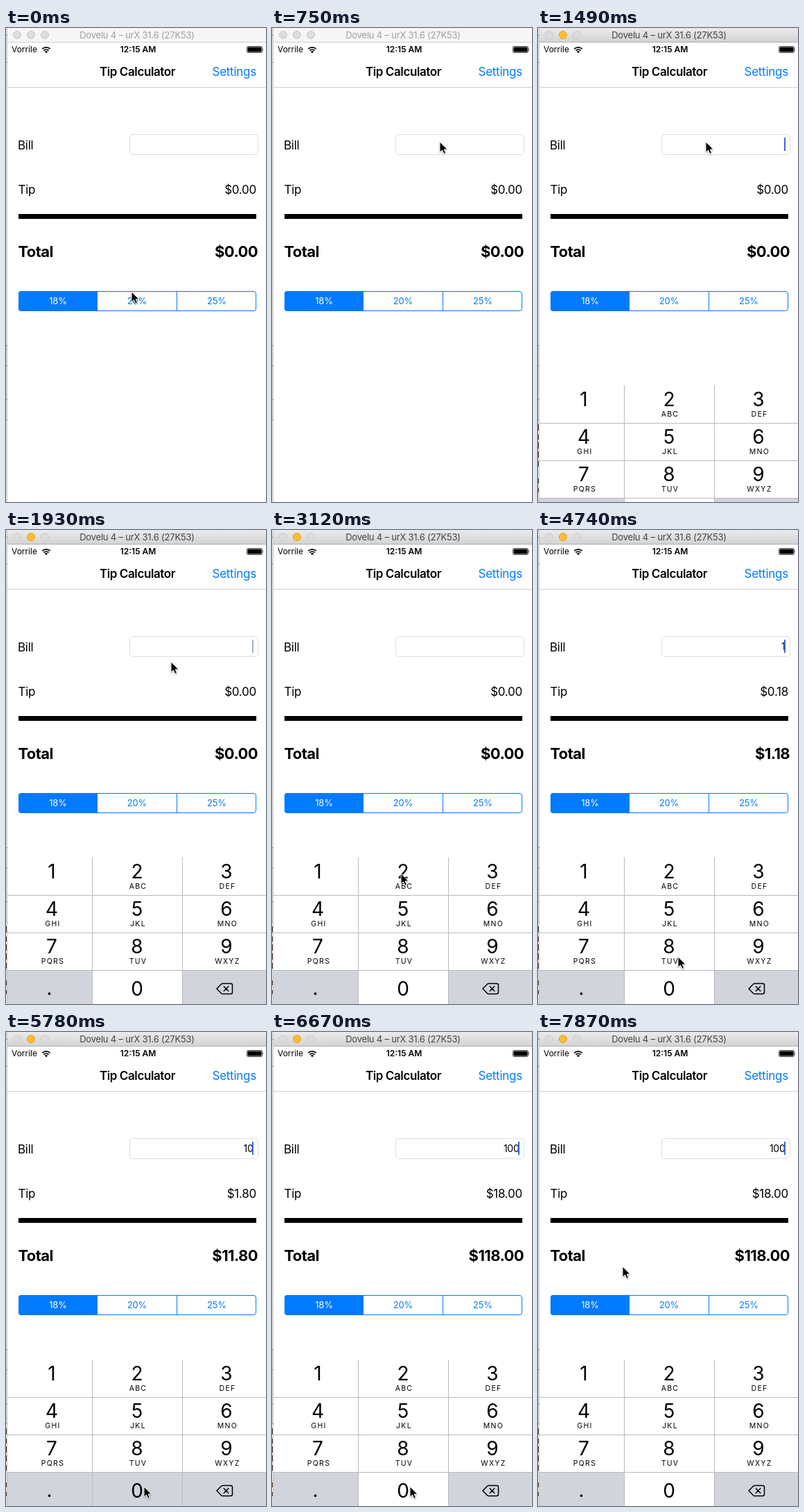
An HTML page for the animation above (8000 ms loop, 375 px wide and 683 px high).

```html
<!DOCTYPE html>
<html lang="en">
<head>
<meta charset="utf-8">
<title>Tip Calculator</title>
<style>
  html, body { margin: 0; width: 100%; height: 100%; overflow: hidden; background: #fff; }
  svg { display: block; width: 375px; height: 683px; font: 17px Inter, "Liberation Sans", sans-serif; letter-spacing: -.25px; }
  .end { text-anchor: end; }
  .mid { text-anchor: middle; }
  .blue { fill: #007aff; }
  .bold { font-size: 22px; font-weight: 700; letter-spacing: -.6px; }
  .semi { font-weight: 600; letter-spacing: -.4px; }
  .small { font-size: 13px; letter-spacing: -.2px; }
  .status { font-size: 12px; letter-spacing: 0; }
  .digit { font-size: 28px; letter-spacing: 0; }
  .letters { font-size: 10.5px; letter-spacing: 1.3px; }
  #bar { fill: #f6f6f6; }
  #bar + path { stroke: #d1d1d1; }
  #title { fill: #9e9e9e; }
  .light { fill: #dcdcdc; stroke: #c9c9c9; }
  .active #bar { fill: url(#chrome); }
  .active #bar + path { stroke: #b1b1b1; }
  .active #title { fill: #444; }
  .active #yellow { fill: #ffbd2e; stroke: #e1a02a; }
  #behind { visibility: hidden; }
  .active #behind { visibility: visible; }
  #cursor { filter: drop-shadow(0 1px 1px #0005); }
</style>
</head>
<body>
<svg id="stage" viewBox="0 0 375 683">
  <linearGradient id="chrome" x2="0" y2="1">
    <stop stop-color="#ebebeb"/><stop offset="1" stop-color="#d3d3d3"/>
  </linearGradient>
  <rect width="375" height="683" fill="#fff"/>

  <!-- sliver of desktop beside the window -->
  <rect width="2" height="683" fill="#e9e9e9"/>
  <rect y="457" width="2" height="108" fill="#d2d2d2"/>
  <path d="M1.5 0V683" stroke="#c2c2c2"/>
  <path d="M0 10.5H2M0 49.5H2M0 457.5H2M0 486.5H2M0 535.5H2M0 564.5H2" stroke="#8a8a8a"/>
  <path id="behind" d="M.5 571V580M.5 586V593M.5 597V606M.5 610V619M.5 624V632M.5 649V656M.5 663V669" stroke="#4a2f20"/>

  <!-- window title bar -->
  <rect id="bar" x="2" width="373" height="20"/>
  <path d="M2 20.5H375"/>
  <circle class="light" cx="16" cy="10" r="5.5"/>
  <circle class="light" id="yellow" cx="36" cy="10" r="5.5"/>
  <circle class="light" cx="56" cy="10" r="5.5"/>
  <text id="title" class="mid small" x="189" y="15">Dovelu 4 – urX 31.6 (27K53)</text>

  <!-- status bar -->
  <text class="status" x="8" y="35">Vorrile</text>
  <g fill="none" stroke="#000" stroke-width="1.8">
    <path d="M52.3 30.2a8.2 8.2 0 0 1 11.4 0M54.5 32.5a5 5 0 0 1 7 0"/>
  </g>
  <path d="M58 36.2L55.9 34.1a3 3 0 0 1 4.2 0Z"/>
  <text class="status mid" x="190.500" y="35" font-weight="600">12:15 AM</text>
  <rect x="347.500" y="26.500" width="22" height="9" rx="1.800" fill="#fff" stroke="#000" stroke-width=".7"/>
  <rect x="348.500" y="27.500" width="20" height="7" rx="1"/>
  <path d="M370.500 29.200q1.500 1.800 0 3.600Z"/>

  <!-- navigation bar -->
  <path d="M2 85.500H375" stroke="#d0d0d0"/>
  <text class="mid semi" x="189.500" y="69">Tip Calculator</text>
  <text class="end blue" x="361" y="69">Settings</text>

  <!-- form -->
  <text x="17" y="175">Bill</text>
  <rect x="178.500" y="153.500" width="185" height="29" rx="4.500" fill="#fff" stroke="#dedede"/>
  <text id="bill" class="end" x="356.500" y="173" font-size="14"></text>
  <rect id="caret" x="355" y="158" width="2" height="19" fill="#3f66d9"/>
  <text x="17.500" y="239">Tip</text>
  <text id="tip" class="end" x="361" y="239"></text>
  <rect x="18" y="268" width="343" height="7"/>
  <text class="bold" x="17.500" y="330">Total</text>
  <text id="total" class="bold end" x="363" y="330"></text>

  <!-- tip rates -->
  <rect x="18.500" y="379.500" width="342" height="28" rx="3.500" fill="#fff" stroke="#007aff"/>
  <path class="blue" d="M132 379H22a4 4 0 0 0-4 4V404a4 4 0 0 0 4 4H132Z"/>
  <path d="M246.500 380V407" stroke="#007aff"/>
  <text class="mid small" x="75" y="398" fill="#fff">18%</text>
  <text class="mid small blue" x="189" y="398">20%</text>
  <text class="mid small blue" x="304" y="398">25%</text>

  <g id="keyboard"></g>
  <path id="cursor" d="M0 0V15.200L3.500 11.900L5.900 17.300L8.500 16.200L6.200 10.900H11Z" stroke="#fff"/>
</svg>
<script>
const $ = id => document.getElementById(id);
const LOOP = 8000, STEP = 148.3, LAST = 53;
const GREY = '#d1d4db';

// Steps at which things happen
const ACTIVATE = 8, FOCUS = 9;
const presses = [{ at: 29, key: 1, bill: '1' }, { at: 39, key: 0, bill: '10' }, { at: 44, key: 0, bill: '100' }];
const slide = { 9: 170, 10: 43 };

// Pointer path: step, x, y
const path = [
  [0, 181, 380], [1, 188, 350], [2, 216, 242], [3, 250, 124], [4, 261, 93], [5, 242, 164],
  [11, 242, 164], [13, 238, 190], [15, 218, 300], [17, 194, 440], [19, 188, 490], [21, 186, 495],
  [22, 160, 503], [23, 122, 505], [24, 92, 499], [26, 80, 495], [28, 78, 494], [29, 78, 494],
  [30, 122, 524], [31, 205, 579], [32, 202, 615], [33, 200, 642], [35, 199, 655],
  [50, 199, 655], [51, 148, 560], [52, 63, 408], [53, 122, 338]
];

const labels = ['', 'ABC', 'DEF', 'GHI', 'JKL', 'MNO', 'PQRS', 'TUV', 'WXYZ'];
const edges = [2, 124, 254, 375], centers = [66, 189, 318];

function buildKeyboard() {
  const cell = (col, row, fill, id = '') =>
    `<rect id="${id}" x="${edges[col]}" y="${472 + row * 54}" width="${edges[col + 1] - edges[col]}" height="54" fill="${fill}"/>`;
  const digit = (n, x, y) => `<text class="mid digit" x="${x}" y="${y}">${n}</text>`;
  let keys = '', text = '';
  labels.forEach((label, i) => {
    const col = i % 3, row = Math.floor(i / 3), x = centers[col];
    keys += cell(col, row, '#fff', 'key' + (i + 1));
    text += digit(i + 1, x, 502 + row * 54) +
      `<text class="mid letters" x="${x + 1.5}" y="${517 + row * 54}">${label}</text>`;
  });
  keys += cell(0, 3, GREY, 'dot') + cell(1, 3, '#fff', 'key0') + cell(2, 3, GREY, 'delete');
  text += digit('.', 62.5, 670) + digit(0, 189, 671);
  $('keyboard').innerHTML = keys +
    '<path d="M124.5 472V683M254.5 472V683M2 526.5H375M2 580.5H375M2 634.5H375" stroke="#b9babd"/>' + text +
    `<path d="M304 661L310.600 654.300Q311.400 653.500 312.500 653.500H324Q326.500 653.500 326.500 656V666
      Q326.500 668.500 324 668.500H312.500Q311.400 668.500 310.600 667.700ZM313.800 657.300L321.200 664.700M321.200 657.300L313.800 664.700"
      fill="none" stroke="#000" stroke-width="1.500" stroke-linejoin="round"/>`;
}

function pointerAt(step) {
  const i = Math.max(1, path.findIndex(p => p[0] >= step));
  const [s0, x0, y0] = path[i - 1], [s1, x1, y1] = path[i];
  const f = (step - s0) / (s1 - s0);
  return [x0 + (x1 - x0) * f, y0 + (y1 - y0) * f].map(Math.round);
}

// The caret restarts its blink on focus and on every key press
function caretAlpha(age) {
  if (age < 0) return 0;
  const phase = age % 7;
  if (phase === 4 || (phase === 0 && age > 0)) return .5;
  return phase < 4 ? 1 : 0;
}

function draw(now) {
  const step = Math.min(LAST, Math.floor((now % LOOP + 14) / STEP));
  const press = presses.filter(p => p.at <= step).pop();
  const bill = press ? press.bill : '';
  const money = rate => '$' + (bill * rate).toFixed(2);

  $('stage').classList.toggle('active', step >= ACTIVATE);
  $('bill').textContent = bill;
  $('tip').textContent = money(.18);
  $('total').textContent = money(1.18);
  $('caret').setAttribute('opacity', caretAlpha(step - (press ? press.at : FOCUS)));
  for (const n of [0, 1])
    $('key' + n).setAttribute('fill', press && press.at === step && press.key === n ? GREY : '#fff');

  const offset = step < FOCUS ? 211 : slide[step] || 0;
  $('keyboard').setAttribute('transform', `translate(0 ${offset})`);
  $('cursor').setAttribute('transform', `translate(${pointerAt(step)})`);
}

buildKeyboard();
(function tick() {
  draw(performance.now());
  requestAnimationFrame(tick);
})();
</script>
</body>
</html>
```
